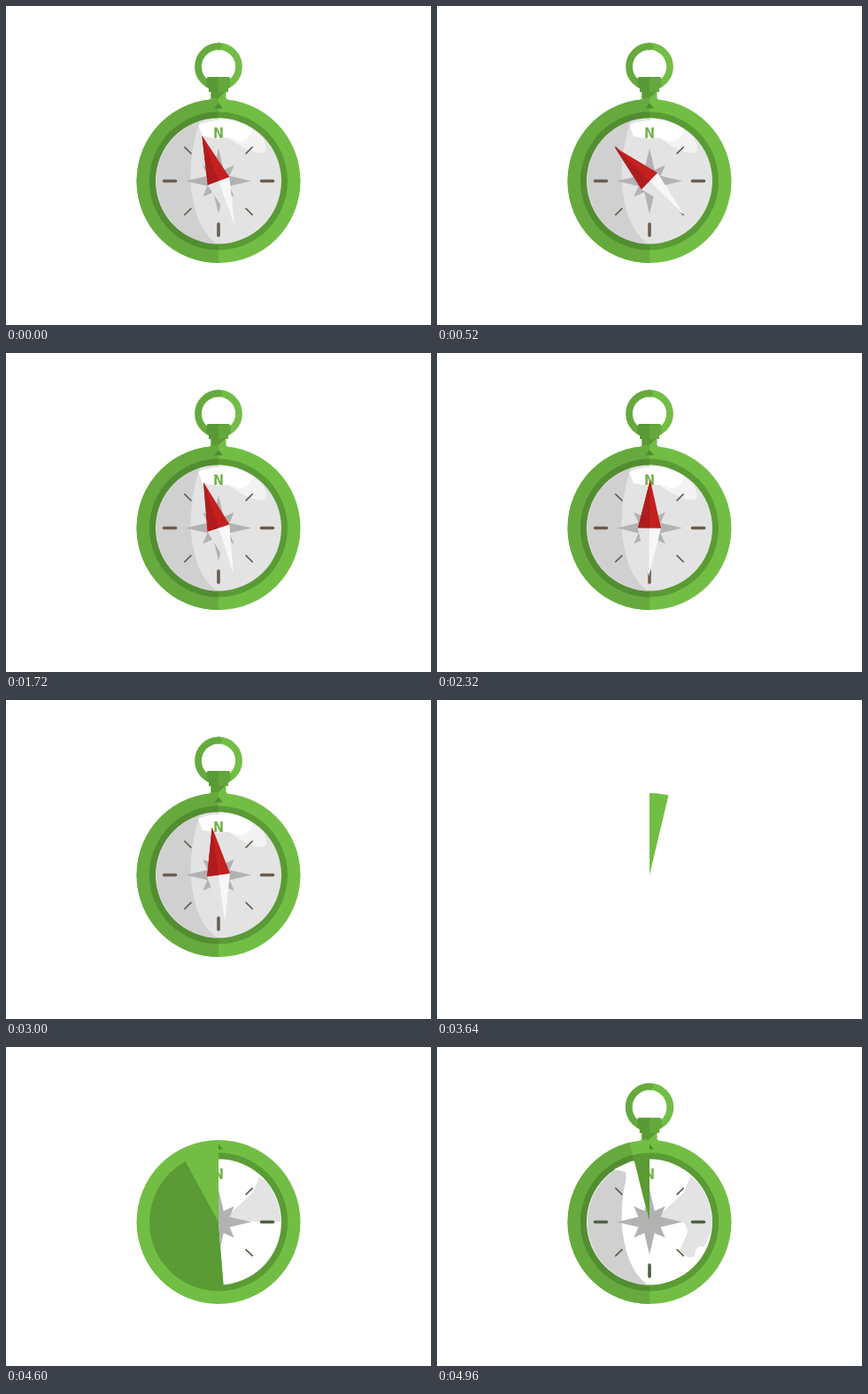
Animation of 480x360 px, one loop 5000 ms. Source, as an HTML page with a canvas:

```html
<!DOCTYPE html>
<html lang="en">
<head>
<meta charset="utf-8">
<title>Compass</title>
<style>
html, body { margin: 0; width: 100%; height: 100%; overflow: hidden; background: #fff; }
canvas { display: block; }
</style>
</head>
<body>
<canvas id="stage" width="480" height="360"></canvas>
<script>
const ctx = document.getElementById('stage').getContext('2d');
const LOOP = 5000, STEP = 40, REVEAL = 3360, WIPE = 1180;
const CX = 240, CY = 197.5, TAU = Math.PI * 2;
const GREEN = '#72be44', GREEN_SHADE = '#66aa3e', RIM = '#5a9b35', RIM_SHADE = '#528e31';

const clamp = x => Math.min(1, Math.max(0, x));

// cubic-bezier(2/3, 0, 1/3, 1), solved by bisection
function ease(x) {
  let lo = 0, hi = 1;
  for (let i = 0; i < 24; i++) {
    const s = (lo + hi) / 2;
    if (2 * s - 3 * s * s + 2 * s ** 3 < x) lo = s; else hi = s;
  }
  return 3 * lo * lo - 2 * lo ** 3;
}

function backOut(x, s = 2.2) {
  const u = x - 1;
  return 1 + (s + 1) * u ** 3 + s * u * u;
}

function disc(r, color, from = 0, to = TAU) {
  ctx.fillStyle = color;
  ctx.beginPath();
  ctx.arc(CX, CY, r, from, to);
  ctx.fill();
}

function poly(color, ...points) {
  ctx.fillStyle = color;
  ctx.beginPath();
  for (let i = 0; i < points.length; i += 2) ctx.lineTo(points[i], points[i + 1]);
  ctx.fill();
}

function shape(color, path) {
  ctx.fillStyle = color;
  ctx.fill(new Path2D(path));
}

function layer(draw) {
  ctx.save();
  draw();
  ctx.restore();
}

function wipe(start, t, draw) {
  const part = ease(clamp((t - start) / WIPE));
  if (part <= 0) return;
  layer(() => {
    ctx.beginPath();
    ctx.moveTo(CX, CY);
    ctx.arc(CX, CY, 110, -TAU / 4, -TAU / 4 + part * TAU);
    ctx.clip();
    draw();
  });
}

function crown(scale) {
  if (scale <= 0) return;
  layer(() => {
    ctx.translate(CX, 105);
    ctx.scale(scale, scale);
    ctx.translate(-CX, -105);
    ctx.lineWidth = 7.8;
    [[GREEN, -1], [GREEN_SHADE, 1]].forEach(([color, side]) => {
      ctx.strokeStyle = color;
      ctx.beginPath();
      ctx.arc(CX, 68.5, 23, side * TAU / 4, side * TAU / 4 + TAU / 2);
      ctx.stroke();
    });
    poly(GREEN, 240, 95, 248.5, 95, 248.5, 104, 253, 109, 240, 109);
    poly(GREEN_SHADE, 240, 95, 231.5, 95, 231.5, 104, 227, 109, 240, 109);
    poly(RIM, 231.5, 96, 248.5, 96, 240, 104, 231.5, 104);
    shape('#64a73c', 'M240 80H251Q253.5 80 253.5 83V91L251 93V97H240Z');
    shape('#599a36', 'M240 80H229Q226.5 80 226.5 83V91L229 93V97H240Z');
  });
}

function star() {
  ctx.fillStyle = '#b2b2b2';
  [[25, TAU / 8], [37, 0]].forEach(([length, turn]) => {
    ctx.beginPath();
    for (let i = 0; i < 8; i++) {
      const r = i % 2 ? 10 : length, a = turn + i * TAU / 8;
      ctx.lineTo(CX + r * Math.cos(a), CY + r * Math.sin(a));
    }
    ctx.fill();
  });
}

function ticks(color) {
  ctx.strokeStyle = color;
  ctx.lineCap = 'round';
  for (let i = 0; i < 8; i++) {
    if (i === 6) continue;
    const a = i * TAU / 8, inner = i % 2 ? 44 : 48.5, outer = i % 2 ? 54 : 61.5;
    ctx.lineWidth = i % 2 ? 1.6 : 3.6;
    ctx.beginPath();
    ctx.moveTo(CX + inner * Math.cos(a), CY + inner * Math.sin(a));
    ctx.lineTo(CX + outer * Math.cos(a), CY + outer * Math.sin(a));
    ctx.stroke();
  }
}

function faceShade() {
  shape('#d0d0d0', 'M219 130Q208 160 208.500 197Q212 250 238 268.500A71 71 0 0 1 219 130Z');
}

function glare() {
  shape('#f3f3f3', 'M240 126.500A71 71 0 0 1 290 149Q297 163 291 165.500Q276 168 249 147Z');
  shape('#fff', 'M217 134A71 71 0 0 1 278 138Q279 145 272 150Q264 155 258 151Q250 147 240 150L222 147Z');
}

function revealFace(t) {
  disc(71, '#fff');
  faceShade();
  poly('#fff', 200, 138, 219, 129, 240, 126, 240, 150, 214, 150, 213, 141);
  poly('#e3e3e3', 250, 191, 279, 164, 286, 146, 297, 155, 307, 175, 311, 197, 252, 197);
  if (t > 4700) {
    shape('#e3e3e3', 'M277 197H311Q309 214 301 226Q292 222 291 236Q284 240 275 232Q273 228 282 213Q285 203 277 197Z');
  }
}

function dial(t, opening) {
  disc(92.5, GREEN_SHADE, TAU / 4, TAU * 3 / 4);
  disc(78, RIM);
  disc(78, RIM_SHADE, TAU / 4, TAU * 3 / 4);
  if (opening) {
    revealFace(t);
  } else {
    disc(71, '#e3e3e3');
    faceShade();
    glare();
  }
  star();
  ticks(opening ? '#4c6240' : '#6b5d50');
  poly('#4f8c30', 235, 115.5, 240, 109.5, 245, 115.5);
  ctx.fillStyle = '#72b24b';
  ctx.font = 'bold 16px "Liberation Sans Narrow", "DejaVu Sans Condensed", "Liberation Sans", sans-serif';
  ctx.textAlign = 'center';
  ctx.fillText('N', CX, 148.5);
}

// slowly damped swing around the rest angle
function needle(t) {
  const angle = -20 - 34.4 * Math.exp(-t / 5400) * Math.sin(TAU * t / REVEAL);
  layer(() => {
    ctx.translate(CX, CY);
    ctx.rotate(angle * TAU / 360);
    poly('#f7f7f7', -13, 0, 13, 0, 0, 54);
    poly('#e4e4e4', -13, 0, 0, 0, 0, 54);
    poly('#c4201f', -13, 0, 13, 0, 0, -54.5);
    poly('#ae1c1d', -13, 0, 0, 0, 0, -54.5);
  });
}

function draw(t) {
  ctx.fillStyle = '#fff';
  ctx.fillRect(0, 0, 480, 360);
  if (t < REVEAL) {
    crown(1);
    disc(92.5, GREEN);
    dial(t, false);
    needle(t);
  } else {
    crown(backOut(clamp((t - 4600) / 394)));
    wipe(3410, t, () => disc(92.5, GREEN));
    wipe(3735, t, () => disc(78, RIM));
    wipe(4015, t, () => dial(t, true));
  }
}

const begin = performance.now();
function tick() {
  const t = (performance.now() - begin) % LOOP;
  draw(Math.floor(t / STEP) * STEP);
  requestAnimationFrame(tick);
}
tick();
</script>
</body>
</html>
```
